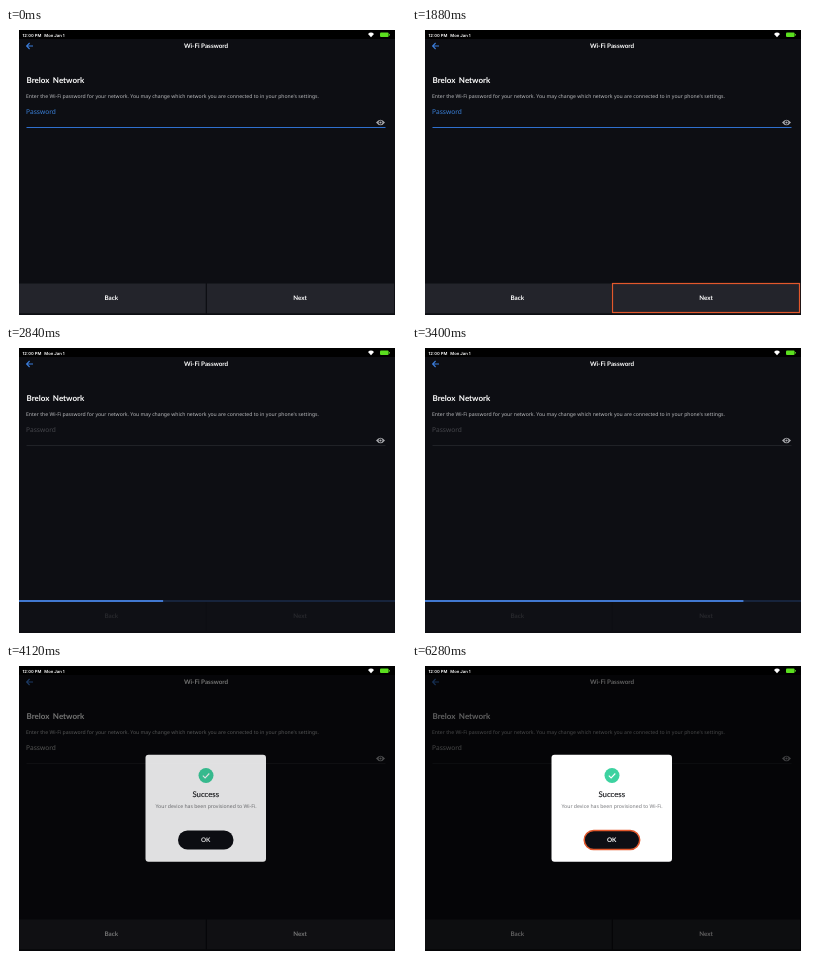
An HTML page for the animation above (6320 ms loop, 400 px wide and 290 px high).

```html
<!DOCTYPE html>
<html lang="en">
<head>
<meta charset="utf-8">
<title>Wi-Fi Password</title>
<style>
  html, body { margin: 0; width: 100%; height: 100%; overflow: hidden; background: #fff; }
  svg { display: block; width: 400px; height: 290px; text-rendering: geometricPrecision; }
  .body { font: 5.13px "Noto Sans", sans-serif; }
  .head { font: bold 6.3px Lato, sans-serif; fill: #fff; }
  .status { font: 600 4.2px Inter, sans-serif; fill: #fff; }
  .mid { text-anchor: middle; }
</style>
</head>
<body>
<svg viewBox="0 0 400 290">
  <rect x="13" y="2" width="376" height="285" fill="#0d0e13"/>

  <path d="M27 18H20.6M23.6 15l-3 3 3 3" fill="none" stroke="#3b7ddb" stroke-width="1.1"/>
  <text class="head mid" x="200" y="20.3">Wi-Fi Password</text>
  <text class="head" x="20.5" y="55.3" style="font-size:8px;word-spacing:1.5px">Brelox Network</text>
  <text class="body" x="20" y="69.9" fill="#b9babd">Enter the Wi-Fi password for your network. You may change which network you are connected to in your phone's settings.</text>
  <text class="body" id="label" x="20" y="86.3" style="font-size:6.6px">Password</text>
  <path id="line" d="M20.5 99.5H379.5"/>
  <path d="M370 94.5q4.5 -5.6 9 0q-4.5 5.6 -9 0z" fill="#a9aaae"/>
  <circle cx="374.5" cy="94.5" r="1.9" fill="#0d0e13"/>
  <circle cx="374.5" cy="94.5" r="1.1" fill="#a9aaae"/>

  <g id="buttons">
    <path d="M13 255.5h186.7v29.7H13zM201 255.5h187v29.7H201z" fill="#23242b"/>
    <text class="head mid" x="105.3" y="272.3">Back</text>
    <text class="head mid" x="294" y="272.3">Next</text>
  </g>
  <rect id="nextRing" x="200.5" y="255.5" width="187" height="29" fill="none" stroke="#e2582c" stroke-width="1.2"/>
  <g id="progress">
    <rect x="13" y="254" width="376" height="2" fill="#17243c"/>
    <rect id="bar" x="13" y="254" height="2" fill="#4178d0"/>
  </g>

  <rect id="shade" x="13" y="2" width="376" height="285"/>
  <rect x="13" y="2" width="376" height="9" fill="#000"/>
  <text class="status" x="16.5" y="9.2">12:00 PM</text>
  <text class="status" x="38.3" y="9.2">Mon Jan 1</text>
  <path d="M362 6q3 -2.8 6 0l-3 3.3z" fill="#fff"/>
  <rect x="374" y="4.6" width="8.6" height="4.4" rx="1" fill="#5be01f"/>
  <rect x="383" y="6" width=".8" height="1.6" fill="#5be01f"/>

  <g id="dialog">
    <rect x="139.5" y="90.8" width="120.5" height="107" rx="3" fill="#fff"/>
    <circle cx="200" cy="111.5" r="7.5" fill="#3dd2a0"/>
    <path d="M196.8 111.6l2.3 2.3 4.2-4.4" fill="none" stroke="#fff" stroke-width="1.1"/>
    <text class="mid" x="199.8" y="132.8" fill="#17181c" stroke="#17181c" stroke-width=".15" style="font:7.8px Lato,sans-serif">Success</text>
    <text class="body mid" x="200" y="143.8" fill="#77787c">Your device has been provisioned to Wi-Fi.</text>
    <rect x="172" y="166.5" width="55.5" height="19" rx="9.5" fill="#0d0e14"/>
    <rect id="okRing" x="172.2" y="166.5" width="55.5" height="19" rx="9.5" fill="none" stroke="#e2582c" stroke-width="1.5"/>
    <text class="head mid" x="199.7" y="178.2">OK</text>
  </g>
</svg>
<script>
  const LOOP = 6320, SUBMIT = 1960, DONE = 3840, SWEEP = 1208;
  const el = id => document.getElementById(id);
  const set = (id, attrs) => {
    for (const name in attrs) el(id).setAttribute(name, attrs[name]);
  };
  const ramp = (t, from, to) => Math.min(1, Math.max(0, (t - from) / (to - from)));

  function draw(t) {
    const editing = t < SUBMIT, loading = !editing && t < DONE;
    const enabled = editing ? 1 : ramp(t, DONE - 40, 4100);
    const shown = ramp(t, DONE, 4160);

    set('label', { fill: editing ? '#3b82dc' : loading ? '#46474c' : '#bbb' });
    set('line', { stroke: editing ? '#2f70cf' : '#25272d', 'stroke-width': editing ? 1.1 : .8 });
    set('buttons', { opacity: .1 + .9 * enabled });
    set('nextRing', { opacity: editing ? ramp(t, 1480, 1680) : 0 });

    // The bar fills steadily, then starts again; it passes 95.2% at 2320 ms.
    const fill = ((t - 2320) / SWEEP + 1.952) % 1;
    set('progress', { opacity: loading ? 1 : 0 });
    set('bar', { width: 376 * fill });

    set('shade', { opacity: .62 * shown });
    set('dialog', { opacity: shown });
    set('okRing', { opacity: ramp(t, 4760, 4960) });
  }

  const start = performance.now();
  function tick() {
    draw((performance.now() - start) % LOOP);
    requestAnimationFrame(tick);
  }
  tick();
</script>
</body>
</html>
```
